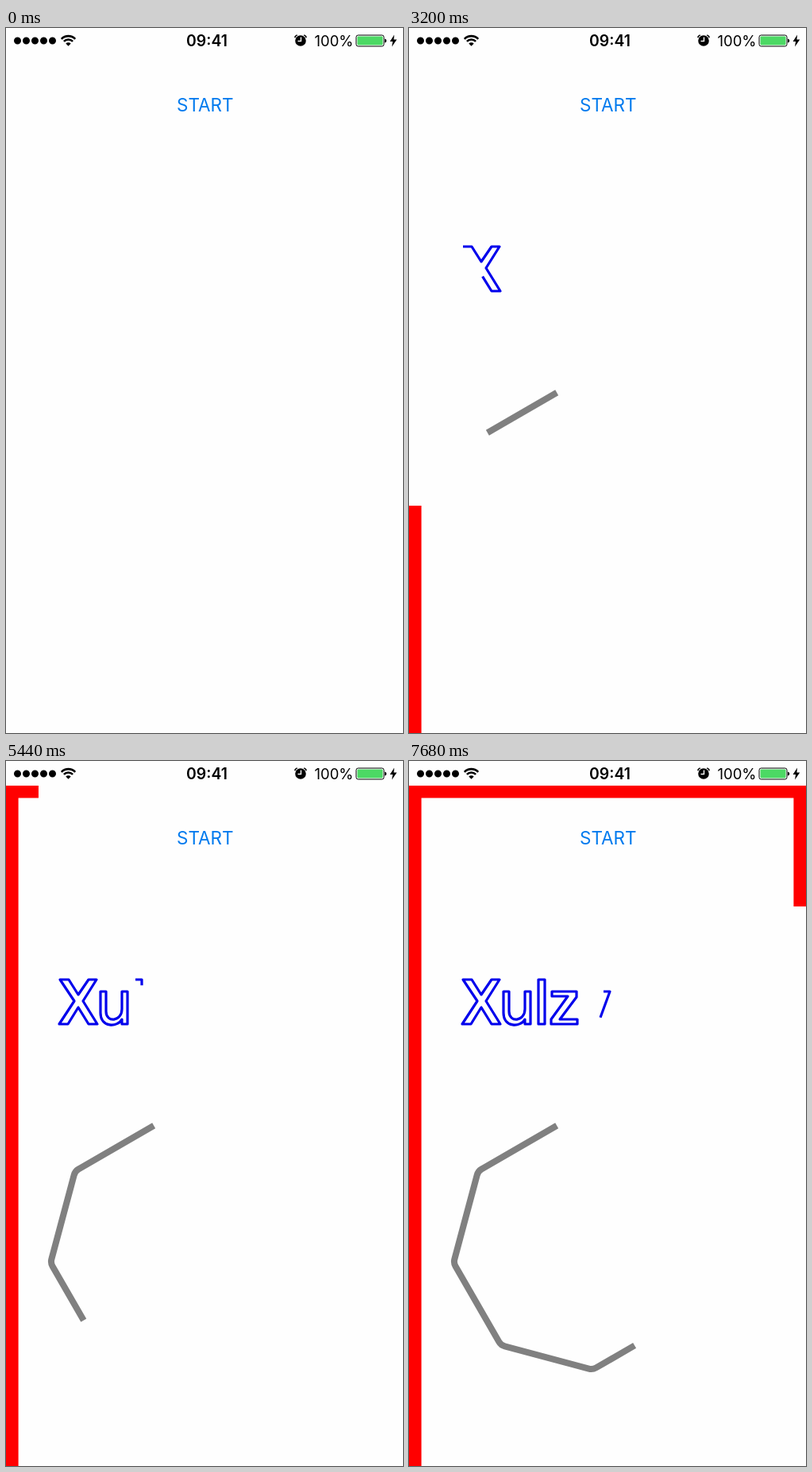
Write an HTML page that moves like this. It is 500 px wide and 887 px high and loops after 8000 ms.

```html
<!DOCTYPE html>
<html lang="en">
<head>
<meta charset="utf-8">
<title>Stroke drawing</title>
<style>
  html, body { margin: 0; width: 100%; height: 100%; overflow: hidden; background: #fefefe; }
  svg { display: block; width: 100vw; height: 100vh; }
  text { font-family: Inter, Roboto, sans-serif; text-anchor: middle; }
  .traces { fill: none; }
</style>
</head>
<body>
<svg viewBox="0 0 500 887">
  <defs><clipPath id="content"><rect y="31" width="500" height="856"/></clipPath></defs>
  <rect width="500" height="887" fill="#fefefe"/>

  <g id="statusBar">
    <path d="M14.5 16h44.1" stroke="#000" stroke-width="9" stroke-linecap="round" stroke-dasharray="0 11"/>
    <g fill="none" stroke="#000" stroke-width="2.6">
      <path d="M69.8 13.8A12.2 12.2 0 0 1 87.2 13.8M72.9 16.9A7.9 7.9 0 0 1 84.1 16.9"/>
    </g>
    <path d="M78.5 22.8L75.3 19.6A4.6 4.6 0 0 1 81.7 19.6Z"/>
    <text x="253" y="22.6" font-size="19.4" font-weight="600">09:41</text>
    <circle cx="371" cy="16" r="6.8"/>
    <path d="M363.9 12.2Q363.8 9.4 367 9.1M375 9.1Q378.2 9.4 378.1 12.2" fill="none" stroke="#000" stroke-width="1.4"/>
    <path d="M371.5 11.5V16.5H367.5" fill="none" stroke="#fff" stroke-width="1.4"/>
    <text x="413" y="22.6" font-size="18.5">100%</text>
    <rect x="441" y="9" width="35" height="14" rx="2.5" fill="#fff" stroke="#000"/>
    <rect x="442.5" y="10.5" width="32" height="11" rx="1" fill="#4cd964"/>
    <path d="M477 13.5Q479.3 14 479.3 16T477 18.5Z"/>
    <path d="M489 8.5L483.5 17H487L486 23.5L492.2 14.6H488.4Z"/>
  </g>

  <text id="start" x="250.8" y="104.8" font-size="22.5" fill="#007aee">START</text>

  <g class="traces" clip-path="url(#content)">
    <g id="name" stroke="#0000ec" stroke-width="3.2" stroke-linejoin="round"/>
    <g id="octagon" stroke="#808080" stroke-width="8"/>
    <g id="border" stroke="#f00" stroke-width="31.2"/>
  </g>
</svg>

<script>
const LOOP = 8000, STEP = 320;
const PRESS = 2040, RELEASE = 2152, FADE = 330;
const byId = id => document.getElementById(id);
const clamp = (v, lo, hi) => Math.min(hi, Math.max(lo, v));

// Octagon with softened corners, heading down-left and turning 45° at each vertex.
function octagonPath(x, y, side, cut) {
  let d = '';
  for (let i = 0; i < 8; i++) {
    const angle = (150 - 45 * i) * Math.PI / 180;
    const dx = Math.cos(angle), dy = Math.sin(angle);
    const from = `${x + dx * cut} ${y + dy * cut}`;
    d += i ? `Q${x} ${y} ${from}` : `M${from}`;
    x += dx * side;
    y += dy * side;
    d += `L${x - dx * cut} ${y - dy * cut}`;
  }
  return d;
}

// Each contour is [path, length]; contours of a trace are drawn one after another.
function makeTrace(id, speed, contours) {
  let begin = 0;
  const parts = contours.map(([d, length]) => {
    const path = document.createElementNS('http://www.w3.org/2000/svg', 'path');
    path.setAttribute('d', d);
    path.setAttribute('pathLength', length);
    byId(id).append(path);
    const part = { path, length, begin };
    begin += length;
    return part;
  });
  return { speed, parts };
}

const traces = [
  makeTrace('name', 0.175, [
    ['M68 275H79L91 294L104 275H114L97 302L115 331H104L91 310L78 331H67L86 302Z', 301],
    ['M146 290H153V331H146V325C141 335 119 336 119 317V290H126V315C126 330 146 328 146 312Z', 259],
    ['M163 275H171V331H163Z', 130],
    ['M180 290H211V297L190 325H212V331H179V325L200 296H180Z', 230],
    ['M245 290H253L238 331C234 345 231 349 222 347V341C228 343 230 340 232 334', 108]
  ]),
  makeTrace('octagon', 0.0966, [[octagonPath(190.5, 456.3, 119.5, 5), 946]]),
  makeTrace('border', 0.2728, [['M0 887V31H500V887Z', 2712]])
];

function drawTrace({ speed, parts }, elapsed) {
  for (const { path, length, begin } of parts) {
    const drawn = clamp(elapsed * speed - begin, 0, length);
    path.style.visibility = drawn > 0 ? 'visible' : 'hidden';
    path.style.strokeDasharray = drawn < length ? `${drawn} ${length * 2}` : 'none';
  }
}

function buttonOpacity(t) {
  return t < PRESS ? 1 : clamp(0.2 + 0.8 * (t - RELEASE) / FADE, 0.2, 1);
}

function render(now) {
  const t = Math.floor(now % LOOP / STEP) * STEP;
  byId('start').setAttribute('opacity', buttonOpacity(t));
  traces.forEach(trace => drawTrace(trace, t - RELEASE));
}

const origin = performance.now();
function tick() {
  render(performance.now() - origin);
  requestAnimationFrame(tick);
}
tick();
</script>
</body>
</html>
```
